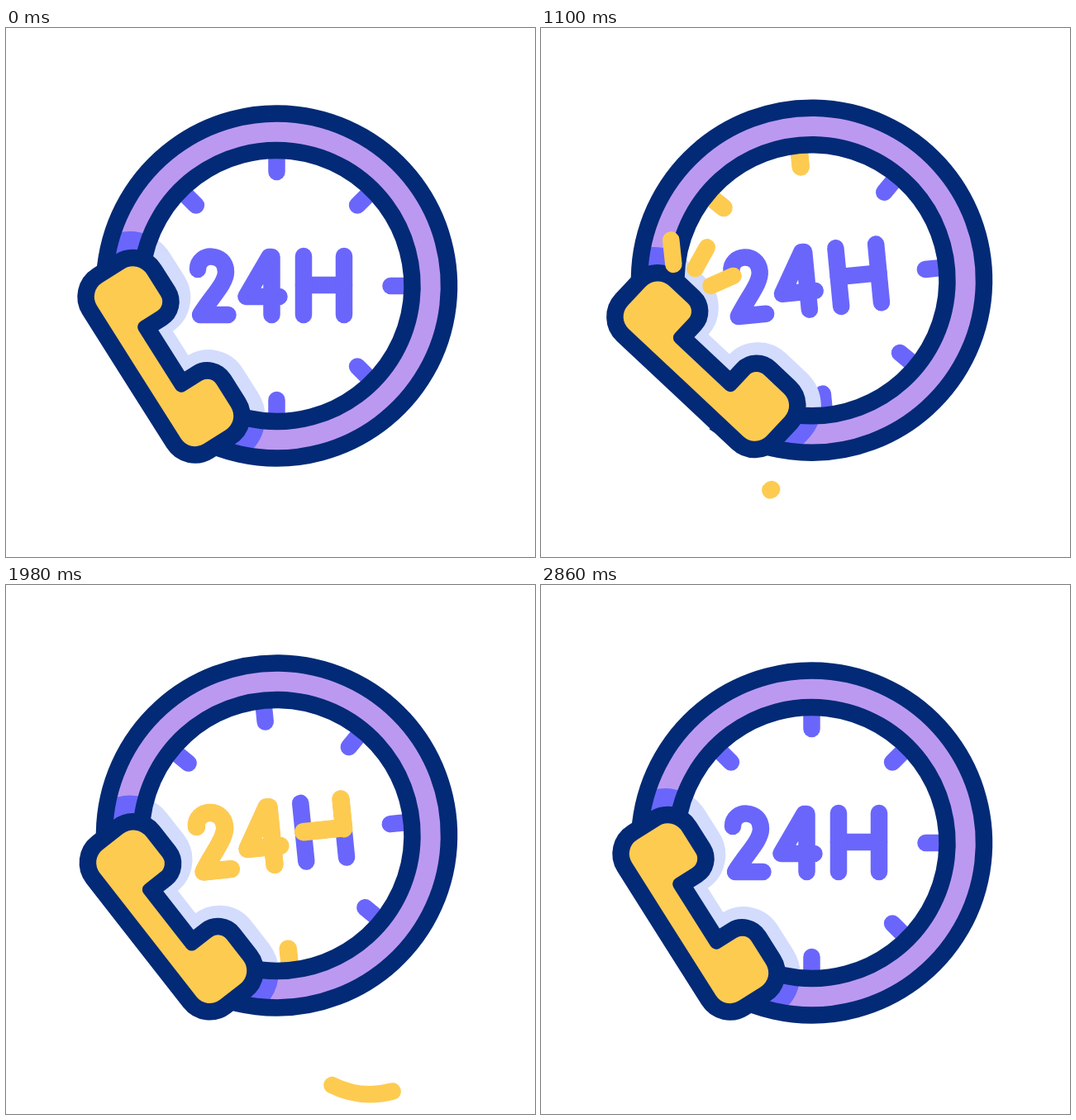
An HTML page with a canvas for the animation above (3200 ms loop, 640x640 px).

```html
<!DOCTYPE html>
<html lang="en">
<head>
<meta charset="utf-8">
<title>24H support line</title>
<style>
  html, body { margin: 0; width: 100%; height: 100%; overflow: hidden; background: #fff; }
  canvas { display: block; width: 640px; height: 640px; }
</style>
</head>
<body>
<canvas id="stage" width="640" height="640" role="img" aria-label="24H"></canvas>
<script>
const LOOP = 3200;
const NAVY = '#032a76', LILAC = '#bb99f1', VIOLET = '#6a66fb';
const YELLOW = '#fecb51', SHADE = '#d3dcfc', WHITE = '#fff';
const ctx = document.getElementById('stage').getContext('2d');
const rad = deg => deg * Math.PI / 180;

// Smooth progress from 0 to 1 between two times
function ease(t, from, to) {
  const u = Math.min(1, Math.max(0, (t - from) / (to - from)));
  return u * u * (3 - 2 * u);
}

// Value of a [time, value] table, eased between entries
function track(keys, t) {
  if (t <= keys[0][0]) return keys[0][1];
  for (let i = 1; i < keys.length; i++) {
    const [t0, v0] = keys[i - 1], [t1, v1] = keys[i];
    if (t < t1) return v0 + (v1 - v0) * ease(t, t0, t1);
  }
  return keys[keys.length - 1][1];
}

const bounce = [[250, 0], [876, -30], [1323, 16], [1771, -30], [2218, 16], [2640, 0]];
const sway = [[420, 0], [1041, -6], [1488, 3.6], [1936, -6], [2383, 3.6], [2840, 0]];
const tilt = [[250, 0], [580, -12.5], [760, -10.8], [1100, -9], [1400, 0]];

// Dial strokes; when = [head start, head end, tail start, tail end]
const strokes = [
  { d: 'M-95.5 -20C-95.5 -41 -61.5 -41 -61.5 -17C-61.5 -3 -78 12 -92.5 35H-59', len: 162, when: [1560, 1850, 2050, 2350] },
  { d: 'M-6 35V-35H-9L-37 13H3', len: 172, when: [1680, 1920, 2100, 2400] },
  { d: 'M32.5 -1H81.5', len: 49, when: [1760, 1950, 2200, 2450] },
  { d: 'M81.5 -36V35', len: 71, when: [1860, 2100, 2450, 2710] },
  { d: 'M32.5 -36V35', len: 71, when: [2020, 2260, 2560, 2820] }
];
for (let k = 0; k < 6; k++) {
  const a = rad(-135 + 45 * k), mid = 1015 + 170 * k;
  const at = r => `${r * Math.cos(a)} ${r * Math.sin(a)}`;
  strokes.push({ d: `M${at(162)}L${at(138)}`, len: 24, when: [mid - 170, mid - 90, mid + 90, mid + 170] });
}
for (const s of strokes) s.path = new Path2D(s.d);

function strokePart(s, t) {
  const [h0, h1, t0, t1] = s.when;
  const head = ease(t, h0, h1), tail = ease(t, t0, t1);
  if (head <= tail) return;
  ctx.setLineDash([(head - tail) * s.len + (head === 1 ? 20 : 0), 400]);
  ctx.lineDashOffset = -tail * s.len;
  ctx.stroke(s.path);
  ctx.setLineDash([]);
}

function disc(r, color) {
  ctx.beginPath();
  ctx.arc(0, 0, r, 0, 7);
  ctx.fillStyle = color;
  ctx.fill();
}

// Open behind the handset, so nothing sticks out past its back
function ring(r) {
  ctx.beginPath();
  ctx.arc(0, 0, r, rad(165), rad(130 + 360));
  ctx.lineWidth = 20.5;
  ctx.lineCap = 'butt';
  ctx.strokeStyle = NAVY;
  ctx.stroke();
  ctx.lineCap = 'round';
}

// Corners: x, y, radius
const corners = [
  [-114.5, 35, 20], [-114.5, -36.5, 20], [-50, -36.5, 13], [-50, 8.5, 8],
  [50, 8.5, 8], [50, -36.5, 13], [116, -36.5, 20], [116, 35, 20]
];
const handset = new Path2D();
handset.moveTo(0, 35);
corners.forEach(([x, y, r], i) => {
  const [nx, ny] = i < 7 ? corners[i + 1] : [0, 35];
  handset.arcTo(x, y, nx, ny, r);
});
handset.closePath();

// Runs draw() in the handset's own coordinates
function inHandset(turn, draw) {
  ctx.save();
  ctx.translate(-137.5, 85);
  ctx.rotate(rad(57.7 + turn));
  draw();
  ctx.restore();
}

function outlined(color, w) {
  ctx.fillStyle = ctx.strokeStyle = color;
  ctx.lineWidth = w;
  ctx.stroke(handset);
  ctx.fill(handset);
}

function shadow(r, color, turn) {
  ctx.save();
  ctx.beginPath();
  ctx.arc(0, 0, r, 0, 7);
  ctx.clip();
  inHandset(turn, () => {
    ctx.translate(-2, 0);
    ctx.scale(1.05, 1.05);
    outlined(color, 67);
  });
  ctx.restore();
}

function swoosh(x, y, from, to, head, tail) {
  if (head <= tail) return;
  const at = p => rad(from + (to - from) * p);
  ctx.beginPath();
  ctx.arc(x, y, 105, at(tail), at(head), to < from);
  ctx.stroke();
}

function sparks(x, y, angles, t, start) {
  const head = ease(t, start, start + 220), tail = ease(t, start + 90, start + 330);
  if (head <= tail) return;
  for (const deg of angles) {
    const c = Math.cos(rad(deg)), s = Math.sin(rad(deg));
    const r0 = 43 + 61 * tail, r1 = 43 + 61 * head;
    ctx.beginPath();
    ctx.moveTo(x + r0 * c, y + r0 * s);
    ctx.lineTo(x + r1 * c, y + r1 * s);
    ctx.stroke();
  }
}

function draw(t) {
  const turn = track(tilt, t);
  ctx.fillStyle = WHITE;
  ctx.fillRect(0, 0, 640, 640);
  ctx.lineCap = ctx.lineJoin = 'round';

  ctx.save();
  ctx.translate(327.5, 312 + track(bounce, t));
  ctx.rotate(rad(track(sway, t)));

  disc(205, LILAC);
  shadow(205, VIOLET, turn);
  disc(164, WHITE);
  ctx.lineWidth = 20.5;
  ctx.strokeStyle = VIOLET;
  for (const s of strokes) ctx.stroke(s.path);
  ctx.lineWidth = 21.5;
  ctx.strokeStyle = YELLOW;
  for (const s of strokes) strokePart(s, t);
  shadow(164, SHADE, turn);
  ring(208.5);
  ring(164);

  inHandset(turn, () => {
    outlined(NAVY, 41);
    ctx.fillStyle = YELLOW;
    ctx.fill(handset);
  });
  ctx.restore();

  ctx.strokeStyle = YELLOW;
  ctx.lineWidth = 20.5;
  swoosh(219, 472, 180, 55, ease(t, 460, 820), ease(t, 800, 1120));
  swoosh(441, 511, 0, 123, ease(t, 1500, 2060), ease(t, 1820, 2100));
  sparks(268, 404, [-77, -47, -18.5], t, 470);
  sparks(165, 330, [-96, -61, -24], t, 990);
}

function frame() {
  draw(performance.now() % LOOP);
  requestAnimationFrame(frame);
}
frame();
</script>
</body>
</html>
```
